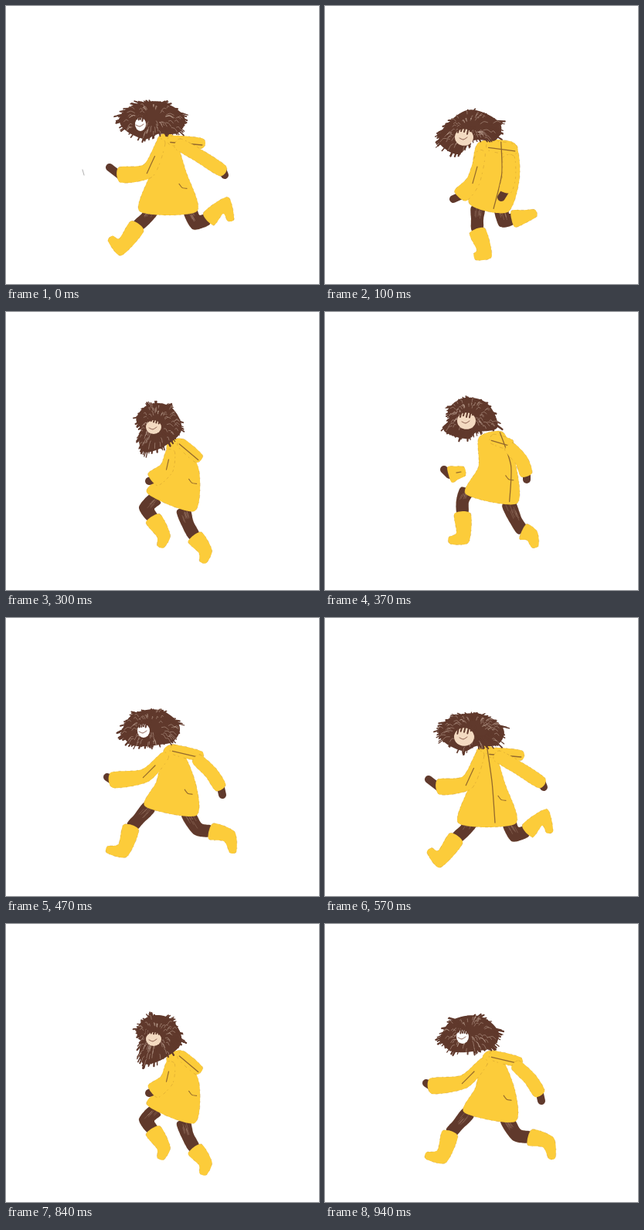
Animation of 405 by 360 pixels, one loop 1.01 s. Source, as an HTML page with a canvas:

```html
<!DOCTYPE html>
<html lang="en">
<head>
<meta charset="utf-8">
<title>Running in a raincoat</title>
<style>
html, body { margin: 0; width: 100%; height: 100%; overflow: hidden; background: #fff; }
canvas { display: block; }
</style>
</head>
<body>
<canvas id="stage" width="405" height="360"></canvas>
<script>
const ctx = document.getElementById('stage').getContext('2d');
const BROWN = '#60392c', YELLOW = '#fccc3a', SKIN = '#f3dac1', PALE = '#efe4d8', SEAM = '#94692c';

// Joints of each pose. arm: shoulder, elbow, cuff, hand. leg: hip, knee, boot top, heel, toe.
// coat: neck, waist, hem, with the width at each. face: x, y, radius.
const stride = {
  hair: '145,142 167,125 205,123 234,143 226,165 197,167 178,174 150,160', face: [180, 154, 13], skin: SKIN,
  coat: '207,169 210,215 210,266', widths: [20, 46, 74], hood: '213,174 254,178', seam: -0.27,
  arms: ['201,176 184,213 147,219 134,209', '222,178 250,194 281,214 283,219'],
  legs: ['189,263 182,274 170,285 148,312 135,301', '237,262 246,280 262,276 284,258 291,277']
};
const leap = { ...stride, face: [174, 153, 7], skin: '#fff', seam: null, speck: '99,212 101,219' };
const land = {
  hair: '146,168 160,148 190,132 229,150 224,174 193,175 172,194 148,182', face: [180, 170, 12], skin: SKIN,
  coat: '222,177 221,218 212,262', widths: [46, 62, 50], hood: '212,181 246,186', seam: -0.25,
  arms: ['202,190 192,226 175,246 166,250', '238,195 238,222 233,240 228,248'],
  legs: ['198,260 197,276 197,291 206,320 194,325', '227,258 232,277 243,276 260,272 273,268']
};
const pass = {
  hair: '163,150 180,127 208,131 218,165 201,183 180,197 165,190 167,168', face: [181, 164, 9], skin: PALE,
  coat: '208,176 219,220 215,264', widths: [18, 45, 48], hood: '214,178 243,194', seam: -0.3,
  arms: ['208,190 204,222 190,249 183,253'],
  legs: ['216,262 217,280 218,294 220,320 206,324', '203,264 203,282 210,280 236,281 241,298']
};
const rise = {
  hair: '167,136 185,117 215,121 230,152 207,175 180,184 171,172 173,152', face: [191, 149, 10], skin: SKIN,
  coat: '219,168 229,205 213,246', widths: [22, 40, 66], hood: '226,169 250,190', seam: null,
  arms: ['213,180 208,202 190,217 185,219'],
  legs: ['194,241 182,254 190,267 204,290 200,304', '229,255 235,274 244,291 258,310 255,324']
};
const push = {
  hair: '158,124 180,109 212,117 226,150 197,157 182,166 152,155 160,138', face: [183, 141, 12], skin: SKIN,
  coat: '215,159 223,200 215,242', widths: [32, 48, 67], hood: '216,164 241,172', seam: -0.72,
  arms: ['181,206 171,208 161,211 154,204', '238,174 254,192 261,211 261,217'],
  legs: ['184,230 178,245 178,261 178,292 161,296', '237,247 247,270 256,284 268,290 272,304']
};
const fly = {
  hair: '147,147 163,123 200,117 227,138 220,160 195,166 165,167 150,156', face: [178, 146, 8], skin: '#fff',
  coat: '215,168 220,212 213,250', widths: [20, 50, 67], hood: '216,170 252,179', seam: null,
  arms: ['206,178 180,204 137,210 131,206', '246,182 265,200 278,220 280,229'],
  legs: ['186,244 172,260 162,271 151,301 131,300', '234,251 248,273 265,276 289,283 294,303']
};

// [start in ms, pose]; poses are held, not blended
const steps = [[0, leap], [100, land], [200, pass], [300, rise], [370, push], [470, fly],
  [570, stride], [670, land], [740, pass], [840, rise], [940, fly]];
const LOOP = 1010;

let rnd;
const seeded = s => () => (s = (s * 16807) % 2147483647) / 2147483647;
const range = (a, b) => a + (b - a) * rnd();
const points = text => text.split(' ').map(p => p.split(',').map(Number));
const mix = (a, b, t) => [a[0] + (b[0] - a[0]) * t, a[1] + (b[1] - a[1]) * t];

// Smooth curve through all points
function curve(pts, closed, k = 0.13) {
  const path = new Path2D(), n = pts.length;
  const at = i => closed ? pts[(i + n) % n] : pts[Math.max(0, Math.min(n - 1, i))];
  path.moveTo(...pts[0]);
  for (let i = 0; i < (closed ? n : n - 1); i++) {
    const [a, b, c, d] = [at(i - 1), at(i), at(i + 1), at(i + 2)];
    path.bezierCurveTo(b[0] + (c[0] - a[0]) * k, b[1] + (c[1] - a[1]) * k,
      c[0] - (d[0] - b[0]) * k, c[1] - (d[1] - b[1]) * k, ...c);
  }
  return path;
}

// Spine shifted sideways; side runs from -1 (left of the figure) to 1
function offset(pts, widths, side) {
  return pts.map((p, i) => {
    const a = pts[Math.max(0, i - 1)], b = pts[Math.min(pts.length - 1, i + 1)];
    const u = Math.atan2(p[1] - a[1], p[0] - a[0]), v = Math.atan2(b[1] - p[1], b[0] - p[0]);
    const from = p === a ? v : u, to = p === b ? u : v;
    const dx = Math.cos(from) + Math.cos(to), dy = Math.sin(from) + Math.sin(to);
    const len = Math.hypot(dx, dy), miter = Math.min(1.4, 2 / len);
    const r = widths[i] / 2 * side * miter / len;
    return [p[0] + dy * r, p[1] - dx * r];
  });
}

function line(pts, color, width) {
  ctx.strokeStyle = color;
  ctx.lineWidth = width;
  ctx.stroke(curve(pts, false));
}

// Tapered strip along a spine, with a broken chalk edge
function ribbon(pts, widths, color) {
  const path = curve([...offset(pts, widths, 1), ...offset(pts, widths, -1).reverse()], true);
  ctx.fillStyle = color;
  ctx.fill(path);
  ctx.setLineDash([range(2, 4), range(4, 8), 1, range(3, 6)]);
  ctx.strokeStyle = 'rgba(150,100,40,.4)';
  ctx.lineWidth = 0.6;
  ctx.stroke(path);
  ctx.setLineDash([]);
}

function drawLeg(text) {
  const [hip, knee, top, heel, toe] = points(text);
  ribbon([hip, knee, top], [17, 16, 14], BROWN);
  for (let i = 0; i < 8; i++) {
    const x = range(-5, 5), t = rnd() * 0.6;
    const shift = p => [p[0] + x, p[1]];
    line([shift(mix(hip, knee, t)), shift(mix(hip, knee, t + 0.4))], 'rgba(215,185,165,.4)', 0.6);
  }
  ribbon([top, heel, toe], [21, 16, 9], YELLOW);
}

function drawArm(text, far) {
  const [shoulder, elbow, cuff, hand] = points(text);
  line([cuff, hand], BROWN, 10);
  ribbon([shoulder, elbow, cuff], far ? [14, 17, 15] : [11, 17, 20], YELLOW);
  if (!far) line([mix(shoulder, elbow, 0.5), mix(shoulder, elbow, 1.1)], SEAM, 1.2);
}

function drawCoat({ coat, widths, hood, seam }) {
  const spine = points(coat), [, waist, hem] = spine;
  ribbon(spine, widths, YELLOW);
  const fold = points(hood);
  ribbon(fold, [12, 13], YELLOW);
  line(offset(fold, [10, 8], -0.5), SEAM, 1.3);
  if (seam) line(offset(spine, widths, -seam).map(p => [p[0], p[1] - 1]), SEAM, 1.3);
  const [x, y] = mix(waist, hem, 0.4);
  line([[x + 14, y - 5], [x + 18, y], [x + 24, y + 1]], SEAM, 1.1);
}

function drawHair(text) {
  const rim = points(text), n = rim.length;
  const center = rim.reduce((s, p) => [s[0] + p[0] / n, s[1] + p[1] / n], [0, 0]);
  const crown = [center[0] + 3, center[1] - 10];
  const lock = (from, to, color, width) => {
    const i = Math.floor(rnd() * n);
    const tip = mix(rim[i], rim[(i + 1) % n], rnd());
    const mid = mix(crown, tip, (from + to) / 2);
    line([mix(crown, tip, from), [mid[0], mid[1] - 2], mix(crown, tip, to)], color, width);
  };
  ctx.fillStyle = BROWN;
  ctx.fill(curve(rim.map(p => mix(center, p, 0.93)), true, 0.18));
  for (let i = 0; i < 90; i++) lock(0.5, range(0.92, 1.12), BROWN, range(1, 2.4));
  for (let i = 0; i < 60; i++) {
    const from = range(0.3, 0.85);
    lock(from, from + range(0.1, 0.25), 'rgba(232,210,195,.55)', 0.7);
  }
}

function drawFace([x, y, r], skin) {
  ctx.fillStyle = skin;
  ctx.beginPath();
  ctx.ellipse(x, y, r, Math.max(9, r * 0.9), 0, 0, 7);
  ctx.fill();
  for (let i = -3; i <= 3; i++) {
    const fx = x + i * r / 3;
    line([[fx + 2, y - 14], [fx, y - range(4, 8)]], BROWN, 2);
  }
  line([[x - 6, y + 1], [x - 1, y + 3], [x + 4, y]], '#7d4d3f', 0.9);
}

function draw(index) {
  const pose = steps[index][1];
  rnd = seeded(index * 977 + 31);
  ctx.fillStyle = '#fff';
  ctx.fillRect(0, 0, 405, 360);
  ctx.lineCap = ctx.lineJoin = 'round';
  pose.legs.forEach(drawLeg);
  drawCoat(pose);
  pose.arms.forEach(drawArm);
  drawHair(pose.hair);
  drawFace(pose.face, pose.skin);
  if (pose.speck) line(points(pose.speck), '#aaa', 1);
}

let shown = -1;
function tick(now) {
  const t = now % LOOP;
  const index = steps.findLastIndex(s => s[0] <= t);
  if (index !== shown) draw(shown = index);
  requestAnimationFrame(tick);
}
draw(shown = 0);
requestAnimationFrame(tick);
</script>
</body>
</html>
```
